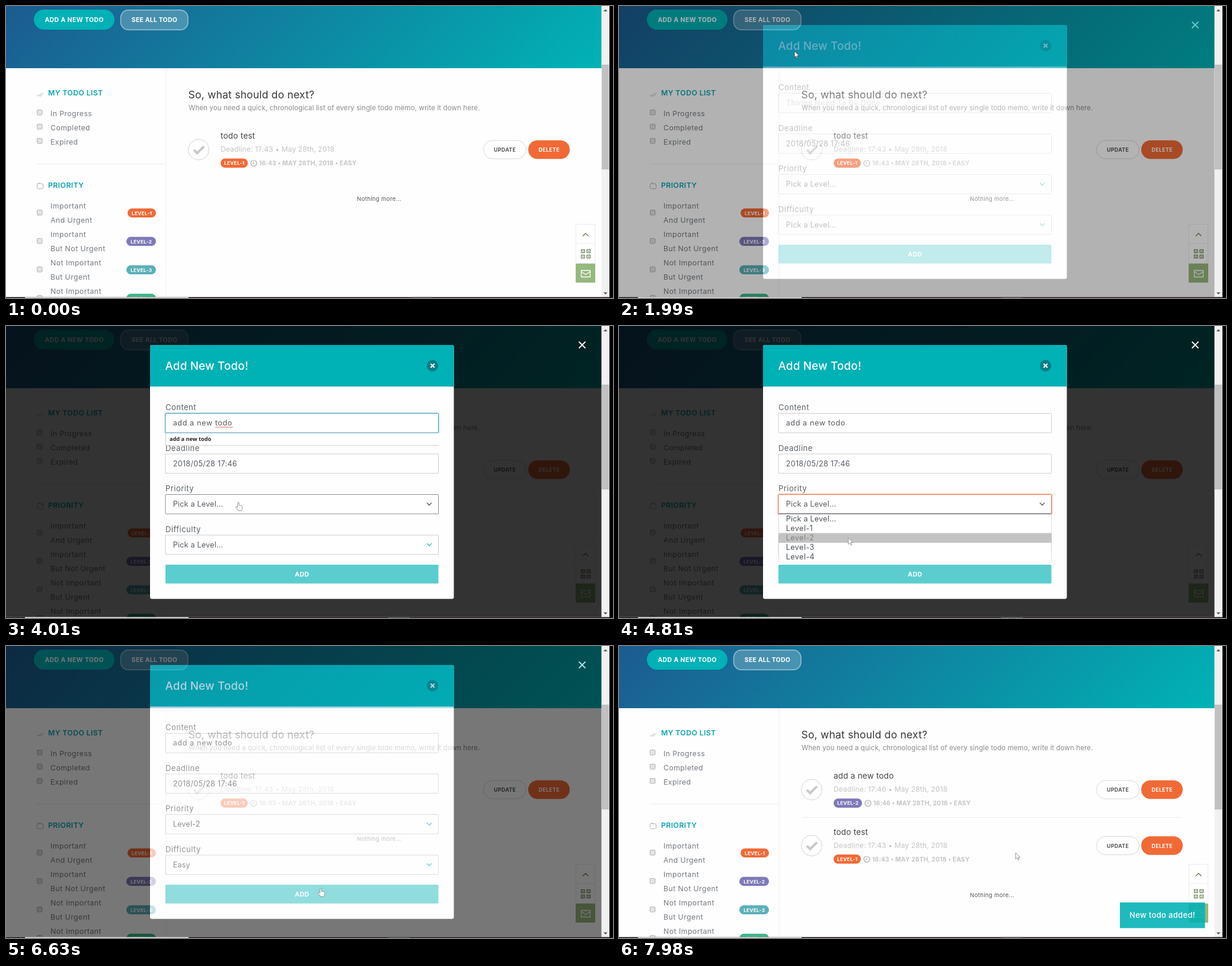
An HTML page for the animation above (8 s loop, 1024x493 px).

```html
<!DOCTYPE html>
<html lang="en">
<head>
<meta charset="utf-8">
<title>Todo list</title>
<style>
  html, body { margin: 0; width: 100%; height: 100%; overflow: hidden; background: #fff; }
  svg { display: block; width: 100%; height: 100%; font-family: Inter, "Open Sans", sans-serif; }
  text { white-space: pre; }
</style>
</head>
<body>
<svg id="stage" viewBox="0 0 1024 493"></svg>
<script>
const LOOP = 8000;
const TEAL = '#00b1b6', ORANGE = '#f16a36', VIOLET = '#7f7ab8';

const TICKS = [0, 310, 420, 540, 650, 760, 980, 1090, 1210, 1320, 1440, 1550, 1720, 1840, 1990,
  2170, 2340, 2450, 2570, 2880, 3030, 3170, 3290, 3410, 3530, 3650, 3770, 3890, 4010, 4390, 4520,
  4670, 4810, 4920, 5110, 5230, 5350, 5470, 5590, 5820, 5930, 6030, 6140, 6360, 6510, 6630, 6750,
  6870, 6990, 7180, 7310, 7510, 7680, 7840, 7980];

const FADE = [[1840, 0], [1990, .37], [2170, 1], [6510, 1], [6870, 0]];
const TOAST = [[7310, 0], [7680, .5], [7980, .88]];
const POINTER = [[310, 795, 448], [760, 165, 26], [980, 140, 24], [1840, 130, 24], [1990, 296, 76],
  [2570, 385, 160], [2880, 385, 172], [3030, 385, 172], [3170, 391, 185], [3650, 391, 186],
  [3890, 392, 298], [4390, 392, 298], [4520, 390, 328], [4670, 388, 357], [4920, 386, 358],
  [5230, 358, 366], [5470, 357, 370], [5590, 357, 394], [6140, 357, 408], [6360, 380, 410],
  [6510, 531, 409], [6990, 531, 409], [7680, 669, 349]];

const between = (t, a, b) => t >= a && t < b;

// Linear interpolation through [time, ...values] keys.
function at(keys, t) {
  const i = keys.findIndex(k => k[0] > t);
  if (i === 0) return keys[0].slice(1);
  if (i < 0) return keys[keys.length - 1].slice(1);
  const a = keys[i - 1], b = keys[i], u = (t - a[0]) / (b[0] - a[0]);
  return a.slice(1).map((v, j) => v + (b[j + 1] - v) * u);
}

const rect = (x, y, w, h, fill, extra = '') =>
  `<rect x="${x}" y="${y}" width="${w}" height="${h}" fill="${fill}" ${extra}/>`;
const line = (d, stroke, w = 1, extra = '') =>
  `<path d="${d}" fill="none" stroke="${stroke}" stroke-width="${w}" ${extra}/>`;
const text = (s, x, y, size, fill, gap = 0, weight = 400, extra = '') =>
  `<text x="${x}" y="${y}" font-size="${size}" fill="${fill}" letter-spacing="${gap}" font-weight="${weight}" ${extra}>${s}</text>`;
const mid = (s, x, y, size, fill, gap, weight) =>
  text(s, x, y, size, fill, gap, weight, 'text-anchor="middle"');
const group = (body, attrs) => `<g ${attrs}>${body}</g>`;

const badge = (n, x, y, w, fill) =>
  rect(x, y, w, 15.4, fill, 'rx="7.7"') + mid('LEVEL-' + n, x + w / 2 + .2, y + 10.8, 8.2, '#fff', .3, 700);

const checkbox = y => rect(52.5, y - 4.5, 8.5, 8.5, '#e4e4e4', 'rx="1.5" stroke="#b2b2b2"');

function sidebar() {
  const grey = '#747a80';
  let s = rect(268, 105, 4, 387, '#f9f9f9') + rect(52, 266.5, 217, 1, '#ececec');
  s += line('M52 150l2.5 2.5 5-5.5M56.5 151l1.500 1.500 5-5.5', '#b5b5b5');
  s += line('M52.500 307.500v-6l1.500-1.500h7.500v1.500h1.200v6l-1.200 1h-8zM54 300v-1h3.500v1', '#b5b5b5');
  s += text('MY TODO LIST', 71, 151.3, 12.3, '#0aa5b0', .35, 600);
  s += text('PRIORITY', 71, 307.3, 12.3, '#0aa5b0', .4, 600);
  ['In Progress', 'Completed', 'Expired'].forEach((name, i) => {
    s += checkbox(180 + 24 * i) + text(name, 75, 185.7 + 24 * i, 12.3, grey, .4);
  });
  const levels = [['Important', 'And Urgent', ORANGE], ['Important', 'But Not Urgent', VIOLET],
    ['Not Important', 'But Urgent', '#5ab1b8'], ['Not Important', '', '#3cb786']];
  levels.forEach(([top, low, fill], i) => {
    const y = 48 * i, x = i ? 203 : 205;
    s += text(top, 75, 341.8 + y, 12.3, grey, .45) + text(low, 75, 365.8 + y, 12.3, grey, .45);
    s += checkbox(349 + y) + badge(i + 1, x, 341.7 + y, 253 - x, fill);
  });
  return s;
}

function todo(title, due, made, level, fill) {
  const shift = level - 1, w = level > 1 ? 48 : 46;
  return '<circle cx="325" cy="242.500" r="17.300" fill="#fff" stroke="#cfcfcf"/>' +
    line('M317 243l5.500 5.500L334 237', '#c9c9c9', 4) +
    text(title, 362, 224, 13.6, '#444', .18) +
    text(`Deadline: ${due} • May 28th, 2018`, 362, 246.3, 12, '#c4c4c4', .15) +
    badge(level, 362, 257.6, w, fill) +
    `<circle cx="${418 + shift * 2}" cy="265.500" r="5" fill="none" stroke="#aaa" stroke-width="1.200"/>` +
    line(`M${418 + shift * 2} 262.500v3.500h-2.500`, '#aaa') +
    text(`${made} • MAY 28TH, 2018 • EASY`, 427 + shift * 2, 269.4, 10.4, '#c6c6c6', .1, 700) +
    rect(805.5, 227, 72, 31, '#fff', 'rx="15.500" stroke="#d8d8d8"') +
    mid('UPDATE', 841.6, 246, 8.8, '#555', .35, 700) +
    rect(881, 226.7, 70, 31.6, ORANGE, 'rx="15.800"') +
    mid('DELETE', 916.2, 246, 8.8, '#fff', .35, 700);
}

function sideButtons() {
  const olive = '#6f8658';
  let s = rect(961.5, 368.5, 32, 66, '#fff', 'stroke="#ebebeb"') + rect(961, 400.5, 33, 1, '#ebebeb');
  s += line('M973 388.500l4.700-4.700 4.700 4.700', olive, 1.5);
  for (const [x, y] of [[970, 411], [979.500, 411], [970, 420], [979.500, 420]])
    s += rect(x + .5, y + .5, 5.500, 5, 'none', `stroke="${olive}" stroke-width="1.300"`) + rect(x + 2.5, y + 2.3, 1.6, 1.6, olive);
  return s + rect(961, 435, 33, 32, '#96b97d') +
    line('M970.500 446.500h15v11h-15zM970.500 448.500l7.500 5 7.500-5', '#fff', 1.3);
}

function page(t) {
  const added = t >= 6870, drop = added ? 94.5 : 0;
  let s = rect(0, 0, 1024, 493, '#fefefe') + rect(0, 0, 1005, 105, 'url(#hero)');
  s += rect(47, 6, 136, 34, TEAL, 'rx="17"') + mid('ADD A NEW TODO', 115.2, 26.5, 10.5, '#fff', .4, 700);
  s += rect(193.5, 6.7, 113.5, 33.6, '#fff', 'rx="13" fill-opacity=".22" stroke="#fff" stroke-opacity=".5" stroke-width="1.500"');
  s += mid('SEE ALL TODO', 250.4, 26.8, 10.5, '#fff', .2, 700);
  s += sidebar();
  s += text('So, what should do next?', 307.5, 155.7, 17.5, '#383838', .2);
  s += text('When you need a quick, chronological list of every single todo memo, write it down here.', 308, 176, 11.4, '#8a8a8a', .16);
  s += group(todo('todo test', '17:43', '16:43', 1, ORANGE), `transform="translate(0 ${drop})"`);
  s += mid('Nothing more...', 629.5, 329 + drop, 9.6, '#555', .33);
  if (t >= 6990) {
    const u = Math.min(1, (t - 6990) / 900);
    const row = todo('add a new todo', '17:46', '16:46', 2, VIOLET) + rect(308, 289, 643, 1, '#ececec');
    s += group(row, `transform="translate(${599 * (1 - u) ** 2} 0)" opacity="${Math.min(1, .1 + 1.1 * u)}"`);
  }
  return s + sideButtons();
}

function field(label, y, value, stroke = '#cdcdcd', glow = '', gap = .2) {
  return text(label, 269, y - 5.2, 13, '#5b6268', .48) +
    (glow ? rect(268, y - 1, 462.5, 35, 'none', `rx="2" stroke="${glow}" stroke-width="2.500" opacity=".45"`) : '') +
    rect(269, y, 460.5, 32.7, '#fff', `rx="1" stroke="${stroke}"`) +
    text(value, 281.7, y + 20.7, 12.6, '#555b61', gap);
}

function select(label, y, value, active, hover) {
  const stroke = active ? '#ea6a43' : hover ? '#8f8f8f' : '#cdcdcd';
  return field(label, y, value, stroke, active ? '#f3a589' : '') +
    line(`M710 ${y + 14}l4 4 4-4`, active || hover ? '#555' : '#25b9bf', 1.3);
}

function menu(y, options, chosen) {
  const h = 16 * options.length;
  return rect(269.5, y, 460, h, '#fff') + rect(269, y, .7, h, '#ccc') + rect(729, y, .7, h, '#ccc') +
    rect(269, y + 16 * chosen, 460.5, 16.5, '#c3c3c3') + rect(269, y - 1, 460.5, 1, '#2d5570') +
    options.map((o, i) => text(o, 281.7, y + 12.6 + 16 * i, 12.6, i === chosen ? '#85807c' : '#4b5157', i ? .45 : .2)).join('');
}

function modal(t) {
  const phrase = 'add a new todo', pick = 'Pick a Level...';
  const typed = t < 3290 ? '' : phrase.slice(0, Math.round((t - 3170) / 720 * phrase.length));
  const focus = between(t, 2880, 4390);
  let s = rect(0, 0, 1005, 491.5, '#000', 'opacity=".8"');
  s += line('M966.500 26.500l11 11m0-11l-11 11', '#fff', 1.8);
  s += rect(243, 32, 512.5, 428.7, '#fefefe', 'rx="3"');
  s += `<path d="M243 102.300V35q0-3 3-3h506.500q3 0 3 3v67.300z" fill="${TEAL}"/>`;
  s += text('Add New Todo!', 268.5, 73.8, 18.8, '#fff', .2, 500);
  s += '<circle cx="719.500" cy="67" r="9.700" fill="#0a7f86"/>' + line('M716.300 63.800l6.500 6.500m0-6.500l-6.500 6.500', '#fff', 2);

  s += field('Content', 147.5, typed, focus ? '#4a8fb8' : '#cdcdcd', focus ? '#8fdde8' : '', .6);
  if (!typed) s += text('Things Need To Be Done', 281.7, 168.2, 12.8, '#cfcfcf', .37, 600);
  if (focus && !typed) s += rect(281.5, 156, 1, 15.5, '#3aa9b0');
  s += field('Deadline', 216, '2018/05/28 17:46', '#cdcdcd', '', .3);
  if (focus && typed) {
    s += rect(269.5, 181, 461, 20.5, '#fff') + rect(269, 181, 1, 20.5, '#ccc') + rect(269, 201, 461.5, 1, '#d0d0d0');
    s += text(phrase, 276, 194, 9.2, '#222', 0, 700, 'font-family="Open Sans, sans-serif"');
    if (typed === phrase) s += line('M353 171.500' + 'l1.500-1.500 1.500 1.500'.repeat(10), '#e0443c', .9);
  }

  s += select('Priority', 284.5, t < 4920 ? pick : 'Level-2', between(t, 4390, 5110), between(t, 4010, 4390));
  s += select('Difficulty', 353, t < 6360 ? pick : 'Easy', between(t, 5350, 6510), false);
  s += rect(269, 403, 460.5, 31.7, '#5bcdcf', 'rx="1.500"') + mid('ADD', 499.4, 422.6, 10.6, '#fff', .3, 700);
  if (between(t, 4390, 4920))
    s += menu(317.5, [pick, 'Level-1', 'Level-2', 'Level-3', 'Level-4'], t < 4670 ? 0 : 2);
  if (between(t, 5350, 6360))
    s += menu(386, [pick, 'Easy', 'Intermediate', 'Advanced'], t < 6030 ? 0 : 1);
  return s;
}

function chrome(t) {
  const x = t < 980 ? 683 : 645;
  return rect(1004.5, 0, 13.5, 493, '#f1f1f1') + rect(1005, 99, 12.5, 177, '#c1c1c1') +
    '<path d="M1008 9h6.500l-3.200-3.500zM1008 483.500h6.500l-3.200 3.500z" fill="#505050"/>' +
    rect(1018, 0, 6, 493, '#000') + rect(0, 491.5, 1024, 1.5, '#1a1016') +
    rect(32, 491.5, 276, 1.5, '#e4e4e4') + rect(x, 491.5, 36, 1.5, '#5a5258');
}

function pointer(t) {
  if (t < 310) return '';
  const [x, y] = at(POINTER, t);
  const hand = between(t, 760, 1990) || between(t, 3890, 4520) || between(t, 6510, 6750);
  const beam = between(t, 2570, 3170);
  const ink = t < 2340 ? '#444' : '#8a8a8a';
  const shape = beam ? line('M-3-7.500h2.500l.5.500.5-.500h2.500M0-7v14M-3 7.500h2.500l.5-.500.5.500h2.500', '#777')
    : `<path d="${hand
      ? 'M-1.200 8V1q0-1.300 1.200-1.300T1.200 1v4l4.500.8q1.600.4 1.400 2l-.8 3.700-1.300 2.500H0L-4.500 8.500q0-1.800 1.500-1.300z'
      : 'M0 0v11l2.600-2.400 1.700 3.800 1.700-.8L4.300 8h3.500z'}" fill="#fff" stroke="${ink}" stroke-width=".9" stroke-linejoin="round"/>`;
  return group(shape, `transform="translate(${x} ${y})"`);
}

function toast(t) {
  const [a] = at(TOAST, t);
  return group(rect(845, 433, 143.5, 43.3, TEAL), `opacity="${a}"`) +
    group(text('New todo added!', 861, 459, 13, '#fff', .33, 500), `opacity="${Math.min(1, a * 1.13)}"`);
}

const hero = `<defs><linearGradient id="hero" gradientUnits="userSpaceOnUse" x1="0" y1="0" x2="554.500" y2="554.500">
  <stop stop-color="#1c5b90"/><stop offset="1" stop-color="#00b3b5"/></linearGradient></defs>`;
const stage = document.getElementById('stage');
let shown = -1;

function draw() {
  const now = performance.now() % LOOP;
  const t = TICKS.filter(k => k <= now).pop();
  if (t !== shown) {
    shown = t;
    const [fade] = at(FADE, t);
    stage.innerHTML = hero + page(t) + (fade ? group(modal(t), `opacity="${fade}"`) : '') +
      toast(t) + chrome(t) + pointer(t);
  }
  requestAnimationFrame(draw);
}
draw();
</script>
</body>
</html>
```
